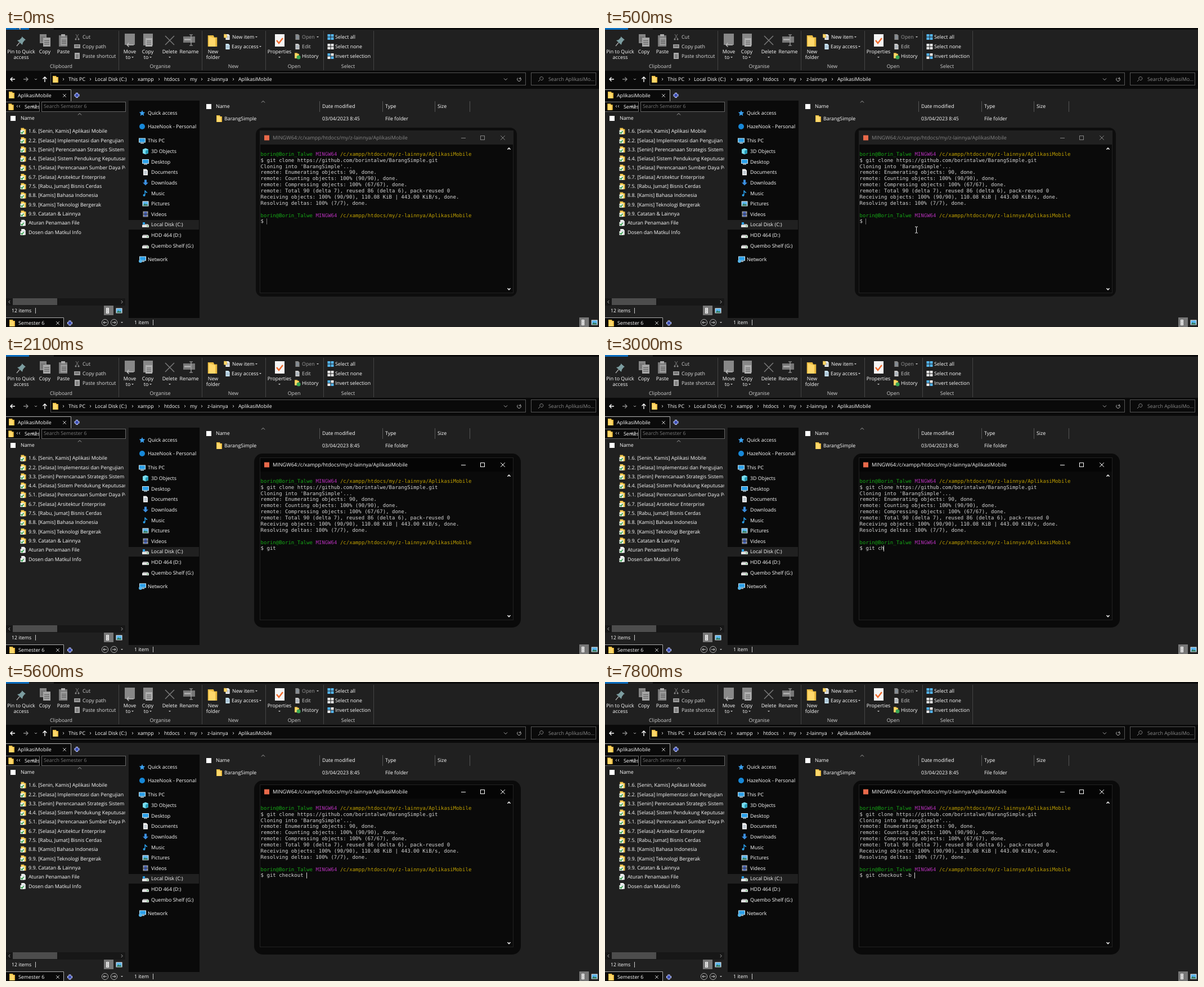
Animation, 1054 px wide and 531 px high, one loop 8 s. Source, as an HTML page:

```html
<!DOCTYPE html>
<html lang="en">
<head>
<meta charset="utf-8">
<title>Cloning a repository</title>
<style>
html, body { margin: 0; width: 100%; height: 100%; overflow: hidden; background: #202020; }
svg { display: block; width: 1054px; height: 531px; }
text { font: 8.87px "Open Sans", "Noto Sans", sans-serif; white-space: pre; text-rendering: geometricPrecision; }
.mono { font: 9.03px "DejaVu Sans Mono", monospace; }
</style>
</head>
<body>
<svg id="stage" viewBox="0 0 1054 531"></svg>
<script>
const stage = document.getElementById('stage');
const GREY = '#888', BLUE = '#2b9fe8', GOLD = '#ffd86b', BLACK = '#0a0a0a';

// Drawing helpers; text and icons are placed by their vertical centre.
const box = (x, y, w, h, fill, extra = '') =>
  `<rect x="${x}" y="${y}" width="${w}" height="${h}" fill="${fill}" ${extra}/>`;
const frame = (x, y, w, h, color) => box(x + .5, y + .5, w, h, 'none', `stroke="${color}"`);
const line = (d, color = '#fff', width = 1) =>
  `<path d="${d}" fill="none" stroke="${color}" stroke-width="${width}"/>`;
const shape = (d, fill) => `<path d="${d}" fill="${fill}"/>`;
const dot = (x, y, r, fill) => `<circle cx="${x}" cy="${y}" r="${r}" fill="${fill}"/>`;
const text = (x, y, str, fill = '#fff', extra = '') =>
  `<text x="${x}" y="${y + 3.2}" fill="${fill}" ${extra}>${str}</text>`;
const centred = (x, y, str, fill) => text(x, y, str, fill, 'text-anchor="middle"');
const mono = (x, y, str, fill = '#d4d4d4') =>
  `<text class="mono" x="${x}" y="${y}" fill="${fill}">${str}</text>`;
const group = (x, y, content, scale = 1) =>
  `<g transform="translate(${x} ${y}) scale(${scale})">${content}</g>`;
const rule = (x, y1, y2, color = '#555') => box(x, y1, 1, y2 - y1, color);

const right = (x, y, color, s = 2) => line(`M${x - s / 2} ${y - s}l${s} ${s}l${-s} ${s}`, color);
const left = (x, y, color, s = 2) => line(`M${x + s / 2} ${y - s}l${-s} ${s}l${s} ${s}`, color);
const down = (x, y, color, s = 3, w = 1) => line(`M${x - s} ${y - s / 2}l${s} ${s}l${s} ${-s}`, color, w);
const up = (x, y, color, s = 3, w = 1) => line(`M${x - s} ${y + s / 2}l${s} ${-s}l${s} ${s}`, color, w);
const caret = (x, y, color = '#ccc') => shape(`M${x - 2} ${y - 1}h4l-2 2z`, color);
const cross = (x, y, s, color, w = 1) =>
  line(`M${x - s} ${y - s}l${2 * s} ${2 * s}m0 ${-2 * s}l${-2 * s} ${2 * s}`, color, w);
const arrow = (x, y, dir, color, s = 4) =>
  line(`M${x - dir * s} ${y}h${dir * 2 * s}m${-dir * 3.5} -3.5l${dir * 3.5} 3.5l${-dir * 3.5} 3.5`, color, 1.4);
const plus = (x, y) => line(`M${x - 4.5} ${y}h9m-4.5 -4.5v9`, '#c3ccff', 4) + line(`M${x - 3.5} ${y}h7m-3.5 -3.5v7`, '#2438a8', 2);
const refresh = (x, y, color) =>
  line(`M${x + 2} ${y - 2.5}a3.3 3.3 0 1 1 -4 0m4 -1v2.5h-2.5`, color);

const folder = (x, y, s = 1) => group(x, y,
  shape('M-5 -6h6l1 2h3v10h-10z', '#e8b93f') + shape('M-4 -5l7 2v9h-7z', GOLD), s);
const page = (x, y, s = 1, fill = '#f2f2f2') => group(x, y,
  shape('M-4 -5.5h5.5l2.5 2.5v8.5h-8z', fill) + line('M-2.5 -1.5h5m-5 2h5m-5 2h5', '#7c93a8', .8), s);
const monitor = (x, y, fill = BLUE) =>
  box(x - 6, y - 4.5, 12, 8, '#cce9f7') + box(x - 5, y - 3.5, 10, 6, fill) + box(x - 3, y + 4, 6, 1.3, '#b9d7e6');
const drive = (x, y) => shape(`M${x - 4} ${y - 1}h8l2 2v4h-12v-4z`, '#aaa') + box(x - 6, y + 1, 12, 3.5, '#e8e8e8') + box(x + 2, y + 2.2, 3, 1, '#35af4b');
const picture = (x, y) => box(x - 5.5, y - 4.5, 11, 9, '#eee') +
  box(x - 4.5, y - 3.5, 9, 7, '#58b4ee') + shape(`M${x - 4.5} ${y + 3.5}l3 -4l2 2l2 -1l2 3z`, '#327a58');
const grid = (x, y, colors) => colors.map((c, i) =>
  box(x - 5.5 + (i % 2) * 6, y - 5 + (i >> 1) * 5.5, 5, 4.5, c)).join('');
const synced = (x, y, body) => body + box(x - 5.5, y - 1.5, 7, 7, '#f0f5f0') +
  line(`M${x - 4.5} ${y + 2}l2 2l3 -4`, '#259a42', 1.5);
const viewIcons = (x, y) => box(x - 9, y - 9, 17, 17, '#777') + box(x - 5, y - 5, 5, 10, '#eee') +
  line(`M${x - 3.5} ${y - 3}h2m-2 3h2m-2 3h2`, '#555') + picture(x + 18, y);

function ribbon() {
  const labels = [
    [27, 42, 'Pin to Quick'], [27, 52, 'access'], [69, 42, 'Copy'], [102, 42, 'Paste'],
    [220, 42, 'Move'], [217, 52, 'to'], [252, 42, 'Copy'], [249, 52, 'to'],
    [291, 42, 'Delete'], [325.5, 42, 'Rename'], [368, 42, 'New'], [368, 52, 'folder'], [486, 42, 'Properties']
  ].map(([x, y, s]) => centred(x, y, s)).join('');
  const groups = [[98, 'Clipboard'], [274, 'Organise'], [404, 'New'], [512, 'Open'], [608, 'Select']]
    .map(([x, s]) => centred(x, 68, s, '#d0d0d0')).join('');
  const small = [
    [136, 16, 'Cut', '#ccc'], [136, 33, 'Copy path', '#ddd'], [136, 50, 'Paste shortcut', '#ddd'],
    [402, 16, 'New item'], [401, 33, 'Easy access'], [526, 16, 'Open', '#999'], [526, 33, 'Edit', '#ccc'],
    [526, 50, 'History'], [585, 16, 'Select all'], [585, 33, 'Select none'], [585, 50, 'Invert selection']
  ].map(a => text(...a)).join('');
  const sheet = (x, y, w, h, fill) => box(x, y, w, h, fill) +
    [.3, .5, .7].map(k => box(x + 2, y + h * k, w - 4, 1, '#555')).join('');
  const icons =
    group(27, 23, shape('M1 -8l7 6l-2 1l-3 4l-1 4l-9 -8l4 -1l4 -4z', '#7c9da0') + line('M-3 3l-5 6', '#aaa', 1.3)) +
    sheet(60, 11, 12, 16, '#858585') + sheet(66, 17, 13, 16, '#a5a5a5') +
    box(94, 13, 15, 20, '#777') + box(98, 11, 7, 4, '#aaa') + sheet(97, 17, 12, 14, '#999') +
    line('M124 11l5 8m0 -8l-5 8', '#777') + dot(124, 20, 1.5, '#888') + dot(129, 20, 1.5, '#888') +
    box(121, 29, 11, 7, '#999') + line('M123 32h7', '#333') + sheet(122, 44, 9, 11, '#aaa') +
    box(211, 10, 18, 20, '#888') + arrow(221, 30, -1, '#bbb', 6) +
    box(244, 10, 17, 21, '#888') + sheet(248, 18, 12, 15, '#b0b0b0') +
    cross(291, 22, 8, '#777', 1.6) +
    box(315, 15, 21, 11, '#777') + box(317, 19, 11, 3, '#aaa') + line('M326 12h6m-3 0v19m-3 0h6', '#aaa', 1.2) +
    folder(367, 23, 1.65) +
    page(394, 16, .9) + folder(390, 14, .55) + page(394, 33, .9, '#cbe7f8') +
    box(478, 11, 17, 22, '#f4f4f4') + line('M481 22l4 5l7 -9', '#ef6a2c', 2.5) +
    page(518, 16, .9, '#888') + page(518, 33, .9, '#ccc') + folder(517, 49, .8) + dot(520, 52, 3.5, '#3aa655') +
    grid(577, 16, Array(4).fill('#54b5f0')) + grid(577, 33, Array(4).fill('#e8e8e8')) +
    grid(577, 50, ['#54b5f0', '#eee', '#eee', '#54b5f0']);
  const carets = [[225, 52], [257, 52], [291, 52], [486, 52], [445, 16], [452, 33], [554, 16]]
    .map(p => caret(...p)).join('');
  return box(0, 0, 41, 3, '#0a6cbd') + box(85, 0, 969, 3, BLACK) + labels + groups + small + icons + carets +
    [200, 348, 461, 564, 653].map(x => rule(x, 5, 75, '#444')).join('');
}

function addressBar() {
  const crumbs = [[111, 'This PC', 150], [158, 'Local Disk (C:)', 225], [234, 'xampp', 272], [281, 'htdocs', 318],
    [327, 'my', 348], [358, 'z-lainnya', 404], [413, 'AplikasiMobile']];
  return box(0, 76, 1054, 32, BLACK) + frame(79, 79, 844, 22, '#555') + frame(933, 79, 115, 22, '#555') +
    arrow(12, 91, -1, '#fff') + arrow(35, 91, 1, '#888') + down(53, 91, '#aaa', 2) +
    line('M69 96v-9m-3.5 3.5l3.5 -3.5l3.5 3.5', '#fff', 1.4) + folder(88, 91) + right(102, 91, '#ccc') +
    crumbs.map(([x, s, sep]) => text(x, 91, s) + (sep ? right(sep, 91, '#ccc') : '')).join('') +
    down(888, 91, '#aaa') + refresh(912, 91, '#bbb') +
    line('M946 95l3.5 -3.5a3 3 0 1 1 1 .8', GREY) + text(964, 91, 'Search AplikasiMo...', GREY);
}

function leftPanel() {
  const items = ['1.6. [Senin, Kamis] Aplikasi Mobile', '2.2. [Selasa] Implementasi dan Pengujian Sistem',
    '3.3. [Senin] Perencanaan Strategis Sistem Informasi', '4.4. [Selasa] Sistem Pendukung Keputusan',
    '5.1. [Selasa] Perencanaan Sumber Daya Perusahaan', '6.7. [Selasa] Arsitektur Enterprise',
    '7.5. [Rabu, Jumat] Bisnis Cerdas', '8.8. [Kamis] Bahasa Indonesia', '9.9. [Kamis] Teknologi Bergerak',
    '9.9. Catatan &amp; Lainnya', 'Aturan Penamaan File', 'Dosen dan Matkul Info'];
  const rows = items.map((s, i) => {
    const y = 183 + i * 16.3;
    return synced(31, y, i < 10 ? folder(31, y, .9) : page(31, y, .95)) + text(40, y, s);
  }).join('');
  return box(0, 109, 115, 21, BLACK) + line('M0 109.5h115.5v20.5', '#aaa') +
    folder(10, 119) + text(21, 120, 'AplikasiMobile') + cross(104, 120, 2.8, '#ccc') + plus(126, 119.5) +
    box(0, 131, 213, 18, BLACK) + frame(-1, 131, 60, 17, '#666') + frame(63, 131, 149, 17, '#666') +
    folder(9, 140, .95) + left(20, 139, '#ccc') + left(24, 139, '#ccc') +
    `<g clip-path="url(#crumbClip)">${text(33, 140, 'Semester 6')}</g>` +
    down(47, 140, '#aaa', 2) + refresh(51, 139, '#999') + text(67, 139, 'Search Semester 6', '#777') +
    box(8, 156, 9, 9, '#fff') + text(26, 160, 'Name') + up(131, 153, '#aaa') +
    `<g clip-path="url(#listClip)">${rows}</g>` +
    box(0, 480, 212, 13, '#171717') + box(12, 480, 79, 12, '#4d4d4d') + left(6, 486.5, '#aaa', 2.5) + right(206, 486.5, '#aaa', 2.5) +
    text(10, 502, '12 items') + rule(52, 497, 507, '#ccc') + viewIcons(183, 502) +
    box(0, 514, 103, 17, BLACK) + line('M0 514.5h102.5v17', '#aaa') +
    folder(11, 524) + text(22, 524, 'Semester 6') + cross(92, 524, 2.8, '#ccc') + plus(113.5, 524) +
    [[176, -1], [192, 1]].map(([x, dir]) => `<circle cx="${x}" cy="523" r="5.6" fill="none" stroke="#aaa"/>` +
      line(`M${x - 3} 523h6m${dir < 0 ? -6 : 0} 0l${-dir * 2} -2m${dir * 2} 2l${-dir * 2} 2`, '#ddd')).join('') + caret(206, 523);
}

function navPane() {
  const music = (x, y) => line(`M${x - 1} ${y + 3}v-8q1 3 4 4`, BLUE, 1.4) + dot(x - 2.5, y + 3.5, 2, BLUE);
  const star = (x, y) => shape(`M${x} ${y - 5}l1.5 3.3l3.7 .4l-2.7 2.5l.8 3.8l-3.3 -2l-3.3 2l.8 -3.8l-2.7 -2.5l3.7 -.4z`, '#3aa0ee');
  const cube = (x, y) => shape(`M${x} ${y - 5.5}l5 2v7l-5 2l-5 -2v-7z`, '#79dcef') + shape(`M${x} ${y - 1}l5 -2v6l-5 2z`, '#259bb8');
  const download = (x, y) => shape(`M${x - 2} ${y - 5}h4v5h3l-5 5l-5 -5h3z`, '#3c8fe0');
  const film = (x, y) => box(x - 4.5, y - 5, 9, 10, '#999') + box(x - 2.5, y - 4, 5, 8, '#4562b8') + line(`M${x - 4.5} ${y}h9`, '#222');
  const entries = [
    [252, 151, 'Quick access', star], [252, 175, 'HazeNook - Personal', (x, y) => dot(x, y, 5, '#1688d8')],
    [252, 200, 'This PC', monitor], [258, 219, '3D Objects', cube], [258, 237.5, 'Desktop', monitor],
    [258, 256, 'Documents', page], [258, 274.5, 'Downloads', download], [258, 293.5, 'Music', music],
    [258, 312, 'Pictures', picture], [258, 330.5, 'Videos', film],
    [258, 349, 'Local Disk (C:)', (x, y) => drive(x, y) + box(x - 5, y - 4, 4, 4, BLUE)],
    [258, 368, 'HDD 464 (D:)', drive], [258, 386.5, 'Quembo Shelf (G:)', drive],
    [252, 411, 'Network', (x, y) => monitor(x + 1, y - 1) + dot(x - 3, y + 3, 3, '#56b6eb')]
  ];
  return box(218, 129, 126, 386, BLACK) + box(218, 341, 125, 17, '#202020') +
    entries.map(([x, y, s, icon]) => icon(x - 10, y) + text(x, y, s)).join('');
}

const fileList = () =>
  box(356, 135, 9, 9, '#fff') + text(373, 139, 'Name') + up(457, 131, '#aaa') +
  text(562, 139, 'Date modified') + text(674, 139, 'Type') + text(767, 139, 'Size') +
  [557, 669, 762, 824].map(x => rule(x, 130, 149)).join('') +
  folder(379, 161) + text(388, 161, 'BarangSimple') + text(562, 161, '03/04/2023 8:45') + text(674, 161, 'File folder') +
  text(228, 523, '1 item') + rule(261, 518, 528, '#ccc') + viewIcons(1028, 523);

const TERM_X = 452.6, CHAR = 5.436, LINE = 10.87;
const termY = row => 226.8 + row * LINE;

function terminalBody() {
  const prompt = row => mono(TERM_X, termY(row), 'borin@Borin_Talwe', '#16a516') +
    mono(TERM_X + 18 * CHAR, termY(row), 'MINGW64', '#b430b8') +
    mono(TERM_X + 26 * CHAR, termY(row), '/c/xampp/htdocs/my/z-lainnya/AplikasiMobile', '#c0a000');
  const output = ['$ git clone https://github.com/borintalwe/BarangSimple.git', "Cloning into 'BarangSimple'...",
    'remote: Enumerating objects: 90, done.', 'remote: Counting objects: 100% (90/90), done.',
    'remote: Compressing objects: 100% (67/67), done.',
    'remote: Total 90 (delta 7), reused 86 (delta 6), pack-reused 0',
    'Receiving objects: 100% (90/90), 110.08 KiB | 443.00 KiB/s, done.', 'Resolving deltas: 100% (7/7), done.'];
  return box(452, 207, 449, 263, BLACK) + up(894, 214.5, '#eee', 2.5, 1.6) + down(894, 463.5, '#eee', 2.5, 1.6) +
    prompt(0) + output.map((s, i) => mono(TERM_X, termY(i + 1), s)).join('') + prompt(10);
}

function titleBar(active) {
  const color = active ? '#fff' : '#858585';
  return (active ? box(441, 175, 474, 309, BLACK, 'rx="15"') : box(444, 177, 464, 300, '#0d0d0d', 'rx="12"')) +
    box(451, 182, 451, 25, active ? '#050505' : '#202020') + frame(451, 182, 450, 288, '#222') +
    box(459, 190.5, 9, 9, '#e8694a') +
    text(474, 195, 'MINGW64:/c/xampp/htdocs/my/z-lainnya/AplikasiMobile', color, 'style="font-size:9.1px"') +
    line('M809 195.5h8', color) + frame(843, 191, 7, 7, color) + cross(883, 195, 3.8, color);
}

stage.innerHTML = `<defs>
  <clipPath id="listClip">${box(0, 170, 212, 310, '#fff')}</clipPath>
  <clipPath id="crumbClip">${box(0, 131, 59, 18, '#fff')}</clipPath></defs>` +
  box(0, 0, 1054, 531, '#202020') + ribbon() + addressBar() + leftPanel() + navPane() + fileList() +
  `<g id="inactive">${titleBar(false)}</g><g id="active">${titleBar(true)}</g>` + terminalBody() +
  `<text id="typed" class="mono" x="${TERM_X}" y="${termY(11)}" fill="#d4d4d4"></text>` +
  '<rect id="cursor" y="338.3" width="1" height="10.5"/>' +
  `<g id="beam">${line('M-2.5 -5.5h2l.5 .5l.5 -.5h2m-2.5 .5v10m-2.5 .5h2l.5 -.5l.5 .5h2', '#eee')}</g>` +
  '<path id="pointer" d="M0 0v12l3 -3l2 5l2 -1l-2 -4.5h4z" fill="#fff" stroke="#000" stroke-width=".6"/>';

const part = id => document.getElementById(id);
const [inactive, active, typed, cursor, beam, pointer] =
  ['inactive', 'active', 'typed', 'cursor', 'beam', 'pointer'].map(part);
const show = (el, on) => el.setAttribute('visibility', on ? 'visible' : 'hidden');

const COMMAND = 'git checkout -b ';
const KEY_TIMES = [1300, 1400, 1500, 1600, 2800, 3000, 3400, 4100, 4300, 4700, 4700, 4700, 4700, 6300, 6600, 6800];
const BLINKS = [[1100, 1300], [2100, 2700], [3900, 4100], [5200, 5600], [6200, 6300], [7300, 7800]];

function render(t) {
  const focused = t >= 600;
  show(active, focused);
  show(inactive, !focused);

  const count = KEY_TIMES.filter(k => k <= t).length;
  typed.textContent = '$ ' + COMMAND.slice(0, count);
  cursor.setAttribute('x', Math.floor(TERM_X + (2 + count) * CHAR - .1));
  cursor.setAttribute('fill', focused ? '#d8d8d8' : '#777');
  show(cursor, !BLINKS.some(([from, to]) => t >= from && t < to));

  const ease = 1 - (1 - Math.min(t / 500, 1)) ** 2;
  const x = 19 + 534 * ease, y = -11 + 369 * ease + (focused ? 1 : 0);
  const overTerminal = x > 451 && y > 207;
  for (const el of [beam, pointer]) el.setAttribute('transform', `translate(${Math.round(x) + .5} ${Math.round(y) + .5})`);
  show(beam, overTerminal && t < 1300);
  show(pointer, !overTerminal);
}

function tick() {
  render(Math.floor(performance.now() % 8000 / 100) * 100);
  requestAnimationFrame(tick);
}
tick();
</script>
</body>
</html>
```
